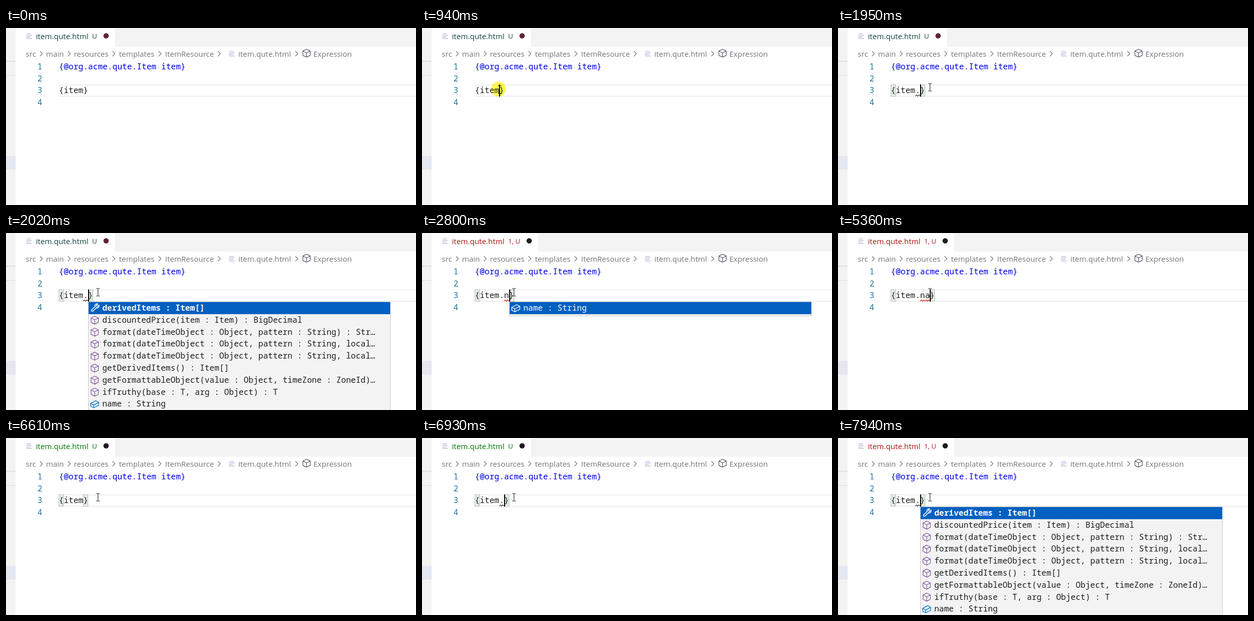
Recreate the animation shown at these times as an HTML page with a canvas. Size 809x351 px, loop 8 s.

```html
<!DOCTYPE html>
<html lang="en">
<head>
<meta charset="utf-8">
<title>Editor completion</title>
<style>
  html, body { margin: 0; width: 100%; height: 100%; overflow: hidden; background: #fff; }
  canvas { display: block; }
</style>
</head>
<body>
<canvas id="stage" width="809" height="351"></canvas>
<script>
const ctx = document.getElementById('stage').getContext('2d');
const LOOP = 8000;
const MONO = '16.04px "Noto Sans Mono", "DejaVu Sans Mono", monospace';
const UI = '"Open Sans", "Noto Sans", sans-serif';
const LEFT = 104.3, CHAR = 9.624, ROW = 23.8;

// Each entry: start time, then the value that holds until the next entry.
const edits = [
  [0, ''], [1950, '.'], [2800, '.n'], [2950, '.na'], [3580, '.name'],
  [5200, '.nam'], [5360, '.na'], [5510, '.n'], [5740, '.'], [6140, ''], [6930, '.']
];
const popups = [
  [0, null], [2020, 'all'], [2800, 'name'], [3580, null], [7010, 'all']
];
const tabs = [
  [0, 'dim'], [2100, 'error'], [3730, 'clean'], [5280, 'error'], [6210, 'clean'], [7010, 'error']
];
const squiggles = [
  [0, false], [1950, true], [3580, false], [5280, true], [6140, false], [6930, true]
];
const pointer = [
  [0, null], [150, [250, 195]], [220, [212, 176]], [460, [184, 151]], [545, [162, 129]],
  [630, [153.5, 122]], [1090, [164, 103]], [1160, [175, 88]], [1240, [181.5, 117.5]]
];
const blinks = [1470, 2480, 3430, 4040, 4590, 5050, 6610, 7400, 7940];
const CLICK = { start: 860, caret: 940, brackets: 1010, end: 1090 };

const tabStyles = {
  dim: { color: '#10403c', dot: '#5c2630', badge: 'U', width: 196 },
  clean: { color: '#007100', dot: '#1c1c1c', badge: 'U', width: 196 },
  error: { color: '#b01011', dot: '#1c1c1c', badge: '1, U', width: 210 }
};
const completions = [
  'derivedItems : Item[]',
  'discountedPrice(item : Item) : BigDecimal',
  'format(dateTimeObject : Object, pattern : String) : Str…',
  'format(dateTimeObject : Object, pattern : String, local…',
  'format(dateTimeObject : Object, pattern : String, local…',
  'getDerivedItems() : Item[]',
  'getFormattableObject(value : Object, timeZone : ZoneId)…',
  'ifTruthy(base : T, arg : Object) : T',
  'name : String'
];

function entryAt(track, t) {
  let found = track[0];
  for (const entry of track) if (entry[0] <= t) found = entry;
  return found;
}
const valueAt = (track, t) => entryAt(track, t)[1];

function rect(x, y, w, h, color) {
  ctx.fillStyle = color;
  ctx.fillRect(x, y, w, h);
}

function text(str, x, y, color, font, align = 'left') {
  ctx.font = font;
  ctx.fillStyle = color;
  ctx.textAlign = align;
  ctx.fillText(str, x, y);
}
const code = (str, x, y, color, weight = '') => text(str, x, y, color, `${weight} ${MONO}`);
const label = (str, x, y, color, size = 15, weight = '') =>
  text(str, x, y, color, `${weight} ${size}px ${UI}`);

function stroke(points, color, width = 1, close = false) {
  ctx.beginPath();
  points.forEach(([x, y], i) => i ? ctx.lineTo(x, y) : ctx.moveTo(x, y));
  if (close) ctx.closePath();
  ctx.strokeStyle = color;
  ctx.lineWidth = width;
  ctx.stroke();
}

function disc(x, y, r, color) {
  ctx.beginPath();
  ctx.arc(x, y, r, 0, Math.PI * 2);
  ctx.fillStyle = color;
  ctx.fill();
}

function fileIcon(x, y) {
  [8, 11, 8, 11].forEach((w, i) => rect(x + (i === 0 ? 1 : 0), y + i * 3, w, 1, '#b39cc4'));
}

function cube(x, y, color) {
  const at = (dx, dy) => [x + dx, y + dy];
  stroke([at(0, -8), at(7.2, -4.3), at(7.2, 4.3), at(0, 8), at(-7.2, 4.3), at(-7.2, -4.3)], color, 1.1, true);
  stroke([at(-7.2, -4.3), at(0, -0.6), at(7.2, -4.3)], color, 1.1);
  stroke([at(0, -0.6), at(0, 8)], color, 1.1);
}

function fieldBox(x, y, color) {
  const at = (dx, dy) => [x + dx, y + dy];
  stroke([at(-8, -1.5), at(2, -6.8), at(8, -3.6), at(8, 2.4), at(-2, 7.2), at(-8, 4)], color, 1.3, true);
  stroke([at(-8, -1.5), at(-2, 1.5), at(8, -3.6)], color, 1.3);
  stroke([at(-2, 1.5), at(-2, 7.2)], color, 1.3);
}

function wrench(x, y, color) {
  ctx.save();
  ctx.translate(x, y);
  ctx.rotate(Math.PI / 4);
  ctx.beginPath();
  ctx.moveTo(-1.8, -1.5);
  ctx.lineTo(-1.8, 8);
  ctx.arc(0, 8, 1.8, Math.PI, 0, true);
  ctx.lineTo(1.8, -1.5);
  ctx.arc(0, -5, 4.2, 1.1, -1.1, true);
  ctx.lineTo(1.6, -5);
  ctx.lineTo(-1.6, -5);
  ctx.lineTo(-1.9, -8.7);
  ctx.arc(0, -5, 4.2, Math.PI + 1.1, Math.PI - 1.1, true);
  ctx.closePath();
  ctx.strokeStyle = color;
  ctx.lineWidth = 1.5;
  ctx.stroke();
  ctx.restore();
}

function drawFrame(tab) {
  rect(0, 0, 809, 351, '#fff');
  rect(0, 0, 809, 37, '#f3f3f3');
  rect(0, 0, 19, 351, '#f3f3f3');
  rect(0, 65, 19, 1.5, '#dadada');
  rect(0, 93, 19, 2, '#e6e6e6');
  rect(0, 254, 19, 27, '#e4e6f1');

  rect(19, 0, tab.width, 37, '#fff');
  fileIcon(40, 11);
  label('item.qute.html', 59, 21.5, tab.color);
  label(tab.badge, 170, 21, tab.color, 13.2, 500);
  disc(tab.width + 1.5, 15.5, 5.2, tab.dot);
}

function drawBreadcrumbs() {
  const crumbs = [
    ['src', 39], ['main', 79], ['resources', 134], ['templates', 223],
    ['ItemResource', 314], ['item.qute.html', 458.5], ['Expression', 606.5]
  ];
  for (const [name, x] of crumbs) label(name, x, 57, '#767676');
  for (const x of [67, 122, 210, 301, 418, 571])
    stroke([[x, 46], [x + 5, 51], [x, 56]], '#767676', 1.2);
  fileIcon(440, 46);
  cube(593, 50, '#4d4059');
}

function drawSquiggle(suffix) {
  const dotOnly = suffix === '.';
  const start = LEFT + (dotOnly ? 5 : 6) * CHAR;
  const width = (dotOnly ? 1 : suffix.length - 1) * CHAR;
  const points = [];
  for (let x = 0; x <= width; x += 2.4)
    points.push([start + x, points.length % 2 ? 132.8 : 135.2]);
  stroke(points, dotOnly ? '#3a3030' : '#e51400', 1.1);
}

function drawCode(t, suffix) {
  const line = '{item' + suffix + '}';
  const closeX = LEFT + (line.length - 1) * CHAR;

  rect(LEFT, 112, 705, 1.5, '#e9e9e9');
  rect(LEFT, 134.5, 705, 1.5, '#e9e9e9');
  if (t >= CLICK.brackets) {
    for (const x of [LEFT, closeX]) {
      const left = Math.round(x);
      rect(left, 112, 10, 24, '#e5f0e5');
      ctx.strokeStyle = '#b9b9b9';
      ctx.lineWidth = 1;
      ctx.strokeRect(left + 0.5, 112.5, 9, 23);
    }
  }
  for (let i = 0; i < 4; i++)
    text(String(i + 1), 71.5, Math.round(81.8 + i * ROW), '#237893', MONO, 'right');

  code('{@org.acme.qute.Item item}', LEFT, 82, '#0000e6');
  disc(301.5, 78, 0.9, '#c4c4c4');
  code(line, LEFT, 129, '#1e1e1e');
  if (valueAt(squiggles, t)) drawSquiggle(suffix);

  const lastEdit = Math.max(CLICK.caret, entryAt(edits, t)[0]);
  const toggles = blinks.filter(b => b > lastEdit && b <= t).length;
  if (t >= CLICK.caret && toggles % 2 === 0) rect(Math.round(closeX), 112, 2, 24, '#000');
}

function drawPopup(kind, suffix) {
  const x = Math.round(LEFT + (5 + suffix.length) * CHAR);
  const height = kind === 'all' ? 230 : 29;
  rect(x, 136, 597, height, '#c8c8c8');
  rect(x + 1, 137, 595, height - 2, '#f3f3f3');
  rect(x + 1, 137, 595, 24, '#0060c0');

  if (kind === 'name') {
    const typed = suffix.slice(1);
    fieldBox(x + 13, 149, '#fff');
    code(typed, x + 28, 154, '#9cd3ff', 'bold');
    code('name : String'.slice(typed.length), x + 28 + typed.length * CHAR, 154, '#fff', 500);
    return;
  }
  completions.forEach((entry, i) => {
    const y = 154 + i * ROW;
    if (i === 0) wrench(x + 14, y - 6, '#fff');
    else if (i === completions.length - 1) fieldBox(x + 13, y - 5, '#007acc');
    else cube(x + 13, y - 5, '#74459b');
    code(entry, x + 28, Math.round(y), i ? '#1e1e1e' : '#fff', i ? '' : 600);
  });
}

function drawPointer(t) {
  const spot = valueAt(pointer, t);
  if (!spot) return;
  const [x, y] = spot;
  if (t >= CLICK.start && t < CLICK.end) {
    ctx.globalCompositeOperation = 'multiply';
    disc(150.8, 121.2, 14.7, '#fdf95c');
    ctx.globalCompositeOperation = 'source-over';
  }
  stroke([[x, y - 7], [x, y + 7]], '#111');
  for (const side of [-1, 1])
    for (const end of [-1, 1])
      stroke([[x, y + end * 7], [x + side, y + end * 7.5], [x + side * 3.5, y + end * 7.5]], '#111');
}

function render(t) {
  const suffix = valueAt(edits, t);
  const popup = valueAt(popups, t);
  drawFrame(tabStyles[valueAt(tabs, t)]);
  drawBreadcrumbs();
  drawCode(t, suffix);
  if (popup) drawPopup(popup, suffix);
  drawPointer(t);
}

const begin = performance.now();
function tick() {
  render((performance.now() - begin) % LOOP);
  requestAnimationFrame(tick);
}
tick();
</script>
</body>
</html>
```
